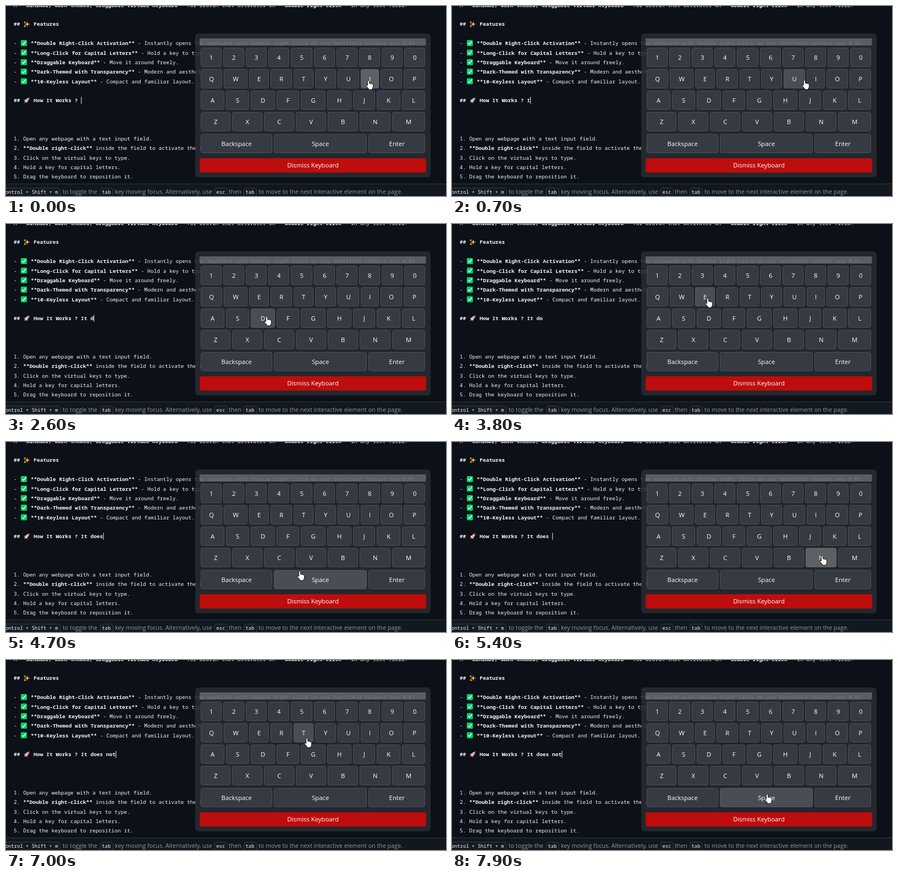
These frames come from a looping animation (800 px wide and 346 px high, 8000 ms). An HTML page:

```html
<!DOCTYPE html>
<html lang="en">
<head>
<meta charset="utf-8">
<title>Virtual keyboard</title>
<style>
html, body { margin: 0; width: 100%; height: 100%; overflow: hidden; background: #0c1117; }
svg { display: block; width: 800px; height: 346px; }
text { white-space: pre; }
.mono { font: 500 9.55px "Noto Sans Mono", "DejaVu Sans Mono", monospace; fill: #f0f6fc; }
.bold { font-weight: 700; }
.label { font: 500 11.3px "Open Sans", "Noto Sans", sans-serif; fill: #fff; text-anchor: middle; }
.note { font: 10.75px "Open Sans", "Noto Sans", sans-serif; fill: #9198a1; }
.kbd { font-size: 8.85px; }
.key { fill: #363a42; stroke: #4b4f56; }
.key.hover { fill: #4a4d55; stroke: #565960; }
.key.down { fill: #5e6064; stroke: #686a6e; }
</style>
</head>
<body>
<svg id="stage" viewBox="0 0 800 346"></svg>
<script>
const CHAR = 5.73, LEFT = 14, BODY = 50.3;
const lineY = n => 36.4 + 17.375 * n;

const mark = s => s.replace(/\*\*.+?\*\*/g, m => `<tspan class="bold">${m}</tspan>`);
const mono = (x, n, s, cls = '') =>
  `<text class="mono ${cls}" x="${x}" y="${lineY(n)}">${mark(s)}</text>`;
const rect = (x, y, w, h, attrs) =>
  `<rect x="${x}" y="${y}" width="${w}" height="${h}" ${attrs}/>`;
const label = (x, y, s) => `<text class="label" x="${x}" y="${y}">${s}</text>`;

// Page text
const features = [
  '**Double Right-Click Activation** - Instantly opens the keyboard with Double right click on any textfield (almost any 0_0).',
  '**Long-Click for Capital Letters** - Hold a key to type capital letters.',
  '**Draggable Keyboard** - Move it around freely.',
  '**Dark-Themed with Transparency** - Modern and aesthetic design.',
  '**10-Keyless Layout** - Compact and familiar layout.'
];
const steps = [
  'Open any webpage with a text input field.',
  '**Double right-click** inside the field to activate the keyboard.',
  'Click on the virtual keys to type.',
  'Hold a key for capital letters.',
  'Drag the keyboard to reposition it.'
];

const check = y => rect(27, y - 9.2, 11, 11, 'rx="1.5" fill="#00d26a"') +
  `<path d="M29.4 ${y - 3.8}l2.3 2.6 4.2 -5.4" fill="none" stroke="#fff" stroke-width="1.4"/>`;
const star = (x, y, r) =>
  `<path d="M${x} ${y - r}Q${x} ${y} ${x + r} ${y}Q${x} ${y} ${x} ${y + r}Q${x} ${y} ${x - r} ${y}Q${x} ${y} ${x} ${y - r}" fill="#f9c23c" stroke="#f9c23c" stroke-width=".7"/>`;
const rocket = `<g transform="translate(38 171.5) rotate(45) scale(.95)">
  <path d="M-2.4 0L-4.8 4.5 -2 3.6M2.4 0L4.8 4.5 2 3.6" fill="#e8402f"/>
  <path d="M-1.3 4L0 7.5 1.3 4" fill="#ffb02e"/>
  <path d="M-2.4 4V-2Q-2 -5 0 -7 2 -5 2.4 -2V4Z" fill="#d5d9df"/>
  <path d="M-2 -3.6Q-1.4 -5.5 0 -7 1.4 -5.5 2 -3.6Z" fill="#e8402f"/>
  <circle cy="-.8" r="1.2" fill="#3b88c3"/></g>`;

const page =
  mono(LEFT, -2, 'A **minimal, dark-themed, draggable virtual keyboard** for brovin that activates on **double right-click** in any text field.') +
  mono(LEFT, 0, '##', 'bold') + star(38.5, 33, 4.2) + star(34.2, 29.6, 1.6) + star(34.4, 36.6, 1.8) +
  mono(BODY, 0, 'Features', 'bold') +
  features.map((s, i) => mono(LEFT, i + 2, '-') + check(lineY(i + 2)) + mono(45, i + 2, s)).join('') +
  mono(LEFT, 8, '##', 'bold') + rocket +
  `<text id="typed" class="mono bold" x="${BODY}" y="${lineY(8)}"></text>` +
  rect(0, 165.5, 1, 12.5, 'id="caret" fill="#f0f6fc"') +
  steps.map((s, i) => mono(LEFT, i + 12, `${i + 1}. ${s}`)).join('');

// Footer hint
const kbd = (x, w, s) => rect(x + .5, 331.5, w, 18, 'rx="4" fill="#151b23" stroke="#343b44"') +
  `<text class="mono kbd" x="${x + w - 3.5 - s.length * 5.31}" y="341.5">${s}</text>`;
const note = (x, s) => `<text class="note" x="${x}" y="342">${s}</text>`;
const footer = rect(0, 324, 800, 22, 'fill="#12181f"') + rect(0, 323.5, 800, 1, 'fill="#343b44"') +
  kbd(-12, 110, 'Control + Shift + m') + note(103, 'to toggle the') +
  kbd(171, 23, 'tab') + note(198, 'key moving focus. Alternatively, use') +
  kbd(379, 23, 'esc') + note(405, 'then') +
  kbd(432, 23, 'tab') + note(459, 'to move to the next interactive element on the page.');

// Keyboard: top, names and left edges (the last edge closes the row)
const rows = [
  [76, [...'1234567890'], Array.from({ length: 11 }, (_, i) => 355 + Math.round(41.1 * i))],
  [115, [...'QWERTYUIOP'], [355, 397, 443, 482, 524, 563, 604, 646, 682, 724, 766]],
  [154, [...'ASDFGHJKL'], [355, 401, 446, 493, 537, 585, 632, 675, 721, 766]],
  [193, [...'ZXCVBNM'], [355, 412, 470, 528, 586, 644, 703, 766]],
  [233, ['Backspace', 'Space', 'Enter'], [355, 488, 660, 766]]
];
const keys = rows.flatMap(([y, names, xs]) =>
  names.map((name, i) => ({ name, x: xs[i], y, w: xs[i + 1] - xs[i] - 4, h: 35 })));

const keyboard =
  rect(344, 50, 428, 262, 'rx="6" fill="rgba(40,44,50,.86)"') +
  rect(352, 59, 411.5, 13, 'fill="rgba(255,255,255,.25)"') +
  keys.map(k => rect(k.x - .5, k.y + .5, k.w, k.h - 1, 'rx="3" class="key"') +
    label(k.x + k.w / 2 - .3, k.y + 22.4, k.name)).join('') +
  rect(352.5, 277.5, 411, 25.5, 'rx="3" fill="#bd0d0d" stroke="#a80f11"') +
  label(558, 294.3, 'Dismiss Keyboard');

const hand = `<path id="hand" fill="#fff" stroke="#000" stroke-width=".9" stroke-linejoin="round"
  d="M-1.6 1.5Q0 -1 1.6 1.5V6Q3 5 4 6.5 5.4 5.6 6.3 7 8 6.4 8.5 8.2V12Q8.5 14 7 15.5V17.3H.2V15.5L-4.2 10.5Q-4.5 8.3 -2.7 8.9L-1.6 10Z"/>`;

const stage = document.getElementById('stage');
stage.innerHTML = page + footer + keyboard + hand;
const [typed, caret, pointer] = ['typed', 'caret', 'hand'].map(id => document.getElementById(id));
const keyRects = stage.querySelectorAll('.key');

// Pointer stops: arrive, leave, x, y
const stops = [
  [0, 600, 659, 135], [1000, 1200, 543, 133], [1500, 1700, 576, 239], [2400, 2700, 474, 168],
  [3100, 3300, 702, 134], [3800, 4000, 465, 135], [4250, 4400, 423, 171], [4700, 4700, 534, 235],
  [4900, 5050, 566, 241], [5350, 5550, 673, 207], [6000, 6250, 693, 134], [6600, 6900, 545, 134],
  [7500, 8000, 573, 244]
];
const strokes = [[500, 'I'], [1200, 't'], [1700, ' '], [2500, 'd'], [3200, 'o'], [4000, 'e'],
  [4400, 's'], [5000, ' '], [5500, 'n'], [6100, 'o'], [6800, 't']];

function pointerAt(t) {
  const i = stops.findIndex(s => t <= s[1]);
  const [arrive, , x, y] = stops[i];
  if (t >= arrive) return [x, y];
  const [, leave, px, py] = stops[i - 1];
  const u = (t - leave) / (arrive - leave), e = u * u * (3 - 2 * u);
  return [px + (x - px) * e, py + (y - py) * e];
}

function draw(now) {
  const t = Math.floor(now % 8000 / 100) * 100;
  const done = strokes.filter(s => s[0] <= t);
  const text = 'How It Works ? ' + done.map(s => s[1]).join('');
  typed.textContent = text;
  caret.setAttribute('x', BODY + .2 + text.length * CHAR);
  const last = done.length ? done[done.length - 1][0] : 0;
  caret.style.opacity = (t - last) % 1060 < 530 ? 1 : 0;

  const [x, y] = pointerAt(t);
  pointer.setAttribute('transform', `translate(${x} ${y})`);
  const down = t < 500 || strokes.some(s => t < s[0] && t >= s[0] - 100);
  keys.forEach((k, i) => {
    const over = x >= k.x && x < k.x + k.w && y >= k.y && y < k.y + k.h;
    keyRects[i].setAttribute('class', 'key' + (over ? down ? ' down' : ' hover' : ''));
  });
}

const start = performance.now();
function tick() {
  draw(performance.now() - start);
  requestAnimationFrame(tick);
}
tick();
</script>
</body>
</html>
```
